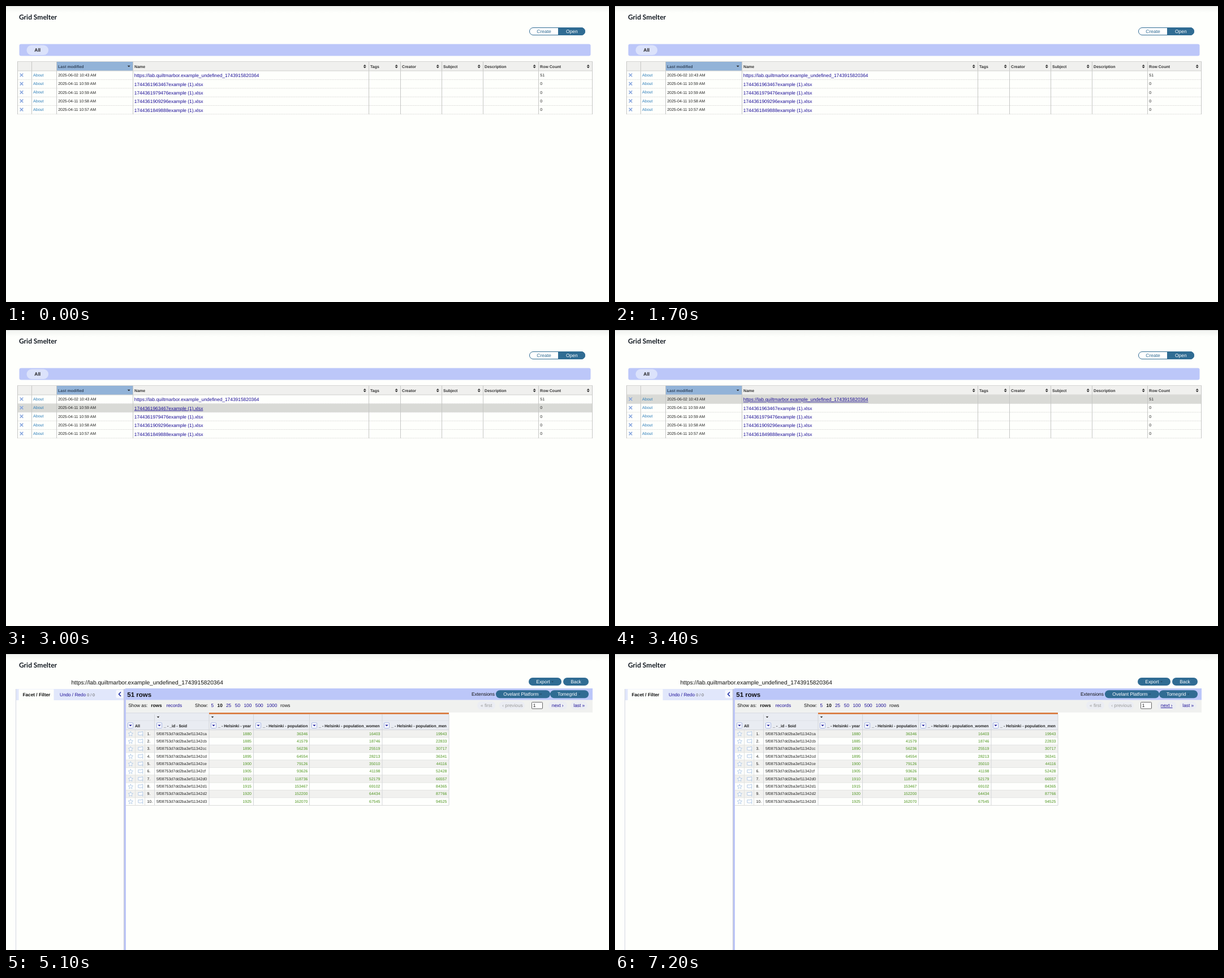
An HTML page that plays this animation: 1066x525 px, repeating every 8000 ms.

```html
<!DOCTYPE html>
<html lang="en">
<head>
<meta charset="utf-8">
<title>Table browser</title>
<style>
  html, body { margin: 0; width: 100%; height: 100%; overflow: hidden; background: #fefffc; }
  svg { display: block; width: 1066px; height: 525px; }
  text { font-family: "Liberation Sans", Arial, sans-serif; text-rendering: geometricPrecision; white-space: pre; }
  .hidden { display: none; }
</style>
</head>
<body>
<svg id="stage" viewBox="0 0 1066 525"></svg>
<script>
const LOOP = 8000;
const LINK = '#1a0d96', STEEL = '#306c93', LAVENDER = '#bcc7f9', INK = '#222';
const DATASET = 'https://lab.quiltmarbor.example_undefined_1743915820364';

const rect = (x, y, w, h, fill, extra = '') =>
  `<rect x="${x}" y="${y}" width="${w}" height="${h}" fill="${fill}" ${extra}/>`;
const text = (x, y, str, size = 7, fill = INK, extra = '') =>
  `<text x="${x}" y="${y}" font-size="${size}" fill="${fill}" ${extra}>${str}</text>`;
const bold = (x, y, str, size = 7, fill = INK) => text(x, y, str, size, fill, 'font-weight="700"');
const right = (x, y, str, fill) => text(x, y, str, 7, fill, 'text-anchor="end"');
const path = (d, stroke, width = 1, extra = 'fill="none"') =>
  `<path d="${d}" stroke="${stroke}" stroke-width="${width}" ${extra}/>`;
const vline = (x, y1, y2, color) => path(`M${x} ${y1}V${y2}`, color);
const hline = (y, x1, x2, color, extra) => path(`M${x1} ${y}H${x2}`, color, 1, extra);
const down = (x, y, r = 2.5, fill = INK) =>
  `<path d="M${x - r} ${y - r / 2}h${2 * r}l${-r} ${r}z" fill="${fill}"/>`;
const up = (x, y, r = 2.5) => `<path d="M${x - r} ${y + r / 2}h${2 * r}l${-r} ${-r}z" fill="${INK}"/>`;
const group = (id, body) => `<g id="${id}" class="hidden">${body}</g>`;
const pill = (x, y, w, label, textX, arrowX) =>
  rect(x, y, w, 14, STEEL, 'rx="7"') + text(textX, y + 10, label, 8.4, '#fff') +
  (arrowX ? down(arrowX, y + 7.2, 2, '#234c69') : '');

function backdrop() {
  return `<defs><linearGradient id="shade" x2="0" y2="1">
      <stop stop-color="#f1f3f0"/><stop offset="1" stop-color="#fefffc"/></linearGradient></defs>` +
    rect(0, 0, 1066, 525, '#fefffc') + rect(0, 0, 1066, 12, 'url(#shade)') +
    rect(0, 0, 1066, 1, '#d2d3d1') +
    `<text x="23" y="23.6" font-size="12" font-weight="700" fill="#111820"
      style="font-family:Lato,'Open Sans',sans-serif">Grid Smelter</text>`;
}

const rowTop = i => 115.4 + 15.3 * i;

function listPage() {
  const columns = [20.5, 45.5, 89.5, 224.5, 641.5, 697.5, 770.5, 843.5, 941.5, 1036.5];
  const titles = ['', '', 'Last modified', 'Name', 'Tags', 'Creator', 'Subject', 'Description', 'Row Count'];
  const projects = [
    ['2025-06-02 10:43', DATASET, 51],
    ['2025-04-11 10:59', '1744361963467example (1).xlsx', 0],
    ['2025-04-11 10:59', '1744361979476example (1).xlsx', 0],
    ['2025-04-11 10:58', '1744361909296example (1).xlsx', 0],
    ['2025-04-11 10:57', '1744361849888example (1).xlsx', 0]
  ];
  let out = rect(925.5, 38.5, 98, 13, '#fff', `rx="6.5" stroke="${STEEL}"`) +
    `<path d="M976 38h41a7 7 0 0 1 0 14h-41z" fill="${STEEL}"/>` +
    text(938.3, 48, 'Create', 8.5, STEEL) + text(990, 48, 'Open', 8.5, '#fff') +
    rect(23.5, 67.5, 1010, 21, LAVENDER, 'rx="3"') +
    rect(36.5, 69.5, 38.5, 17.5, '#dbe2fb', 'rx="8.7"') + bold(50.3, 81, 'All', 8.5) +
    rect(20.5, 98, 1016, 17, '#f0f0ee') + rect(90, 98, 134, 17, '#92b3d8') +
    rect(20.5, 0, 1016, 15.3, '#d9dad6', 'id="hover" class="hidden"');
  titles.forEach((title, i) => {
    out += bold(columns[i] + 2.6, 109.7, title, 7, i === 2 ? '#34465e' : '#333');
    const x = columns[i + 1] - 7.3;
    if (i === 2) out += down(x, 107);
    if (i > 2) out += up(x, 105.3) + down(x, 108.9);
  });
  projects.forEach(([date, name, count], i) => {
    const y = rowTop(i), mid = y + 7.1;
    out += path(`M24.7 ${mid - 2.8}l5.6 5.6m0 -5.6l-5.6 5.6`, '#86a5de', 1.5) +
      text(48, y + 9.4, 'About', 7.1, '#2b7cb8') + text(92.2, y + 9.5, date + ' AM') +
      text(226.8, y + 11, name, 8.4, LINK, 'class="name"') + text(944.3, y + 9.5, count) +
      hline(y + 15.2, 20.5, 1036.5, '#dcdcda', 'stroke-dasharray="2 1"');
  });
  columns.forEach(x => out += vline(x, 98, 192, '#c6c7c5'));
  return out + hline(98.5, 20.5, 1036.5, '#d4d4d2') + hline(115, 20.5, 1036.5, '#cfcfcd');
}

function dataFrame() {
  return text(115.4, 53.5, DATASET, 10.2, '#111') +
    pill(924, 42, 58, 'Export', 937.3, 966) + pill(985, 42, 45, 'Back', 998.2) +
    rect(17, 62, 192, 20, '#e1e7fb') + vline(17.5, 62, 525, '#d3d7e2') +
    rect(22.5, 62.5, 62, 20, '#fefffc') + bold(29.4, 75.2, 'Facet / Filter', 8.3, '#111') +
    text(95, 75.2, 'Undo / Redo', 8.2, LINK) + text(143.3, 75.2, '0 / 0', 7, '#555') +
    rect(194.5, 64, 13, 14, '#f5f7fe', 'rx="2"') + path('M203 67.5l-3.5 3.7 3.5 3.7', '#2333a8', 1.6) +
    rect(208, 62, 4, 463, '#bdc6f7') + vline(208.5, 62, 525, '#c2c5d2') +
    rect(211, 61, 826, 20.7, LAVENDER);
}

const star = (x, y) => {
  let d = '';
  for (let i = 0; i < 10; i++) {
    const a = i * Math.PI / 5, r = i % 2 ? 2 : 4.5;
    d += `${i ? 'L' : 'M'}${(x + r * Math.sin(a)).toFixed(1)} ${(y - r * Math.cos(a)).toFixed(1)}`;
  }
  return path(d + 'z', '#a9c4e4', 0.8, 'fill="#fcfdff"');
};
const flag = (x, y) => path(
  `M${x + 3.5} ${y + 4.5}v-8.5q-4 1.8 -8 1v5q4 1.2 8 -.5`, '#adc6e4', 0.9, 'fill="#fbfcff"');

function dataTable() {
  const values = [
    [36346, 16403, 19943], [41579, 18746, 22833], [56236, 25519, 30717], [64554, 28213, 36341],
    [79126, 35010, 44116], [93626, 41198, 52428], [118736, 52179, 66557], [153467, 69102, 84365],
    [152200, 64434, 87766], [162070, 67545, 94525]
  ];
  const heads = [[215, 'All'], [266, '_ - _id - $oid'], [362, '_ - Helsinki - year'],
    [441, '_ - Helsinki - population'], [540, '_ - Helsinki - population_women'],
    [668, '_ - Helsinki - population_men']];
  const edges = [262.5, 359, 437.5, 536.5, 665, 783];
  const ends = [434, 533.5, 661.5, 779.5];

  let out = bold(214.3, 76, '51 rows', 11.5, '#111') + text(823, 74.3, 'Extensions', 8.4, '#111') +
    pill(866, 64.3, 96, 'Ovelant Platform', 879.2, 945.5) + pill(962, 64.3, 68, 'Tomegrid', 975, 1013.5) +
    rect(212, 81.7, 825, 22, '#f0f1ef');

  const bar = (x, str, fill = '#111') => text(x, 94, str, 8.3, fill);
  out += bar(216.3, 'Show as:') + bold(256.3, 94, 'rows', 8.3, '#111') + bar(283.4, 'records', LINK) +
    bar(334, 'Show:') + bold(373.6, 94, '10', 8.3, '#111') + bar(485, 'rows');
  [[362.5, 5], [389, 25], [404.8, 50], [420.5, 100], [440.8, 500], [460.8, 1000]]
    .forEach(([x, n]) => out += bar(x, n, LINK));
  [[833, 32], [872, 45], [959, 33], [998, 30]]
    .forEach(([x, w]) => out += rect(x, 84, w, 14.5, '#ebedf3', 'rx="7"'));
  out += bar(839, '« first', '#999') + bar(877.3, '‹ previous', '#999') +
    text(964.8, 94, 'next ›', 8.3, LINK, 'id="next"') + bar(1003.3, 'last »', LINK) +
    rect(929.5, 85.5, 19, 11.5, '#fff', 'stroke="#666" rx="1"') + bar(931.8, '1');

  out += rect(212, 104, 571, 30.5, '#e9ecf2') + hline(104.5, 212, 359, '#d5d8df') +
    hline(118, 212, 783, '#dfe2e8') + rect(359, 104, 424, 2.7, '#d9783c') +
    down(269, 112, 2.3) + down(365, 112, 2.3);
  heads.forEach(([x, label]) => {
    out += rect(x + 0.5, 122, 9, 9.5, '#fcfdff', 'stroke="#a5b3e2" rx="1"') +
      down(x + 5, 126.8, 2.8, '#1b1b9c') + bold(x + 13, 129.5, label, 7.05);
  });

  values.forEach((row, i) => {
    const y = 134.6 + 13.36 * i, base = y + 9;
    out += rect(212, y, 571, 13.36, i % 2 ? '#fefffd' : '#f1f1ef') +
      hline(y, 212, 783, '#e4e5e3') +
      star(220.3, y + 7.2) + flag(238.3, y + 6.9) + text(249.4, base, `${i + 1}.`) +
      text(266, base, '5f08753d7dd2ba3ef11342' + (0xca + i).toString(16), 7.03);
    [1880 + 5 * i, ...row].forEach((n, c) => out += right(ends[c], base, n, '#4f9620'));
  });
  [228.5, 245.5].forEach(x => out += vline(x, 134.6, 268.5, '#e0e1e0'));
  edges.forEach(x => out += vline(x, 107, 268.5, '#d4d6da'));
  return out + hline(134.5, 212, 783, '#d4d6da') + hline(268.5, 212, 783, '#d9dad9');
}

const byId = id => document.getElementById(id);
byId('stage').innerHTML = backdrop() + group('list', listPage()) +
  group('frame', dataFrame()) + group('table', dataTable());

const names = [...document.querySelectorAll('.name')];
const show = (id, on) => byId(id).classList.toggle('hidden', !on);
const underline = (el, on) => el.setAttribute('text-decoration', on ? 'underline' : 'none');

// The pointer enters at the bottom row and climbs to the first one.
function hoveredRow(t) {
  if (t < 2400) return -1;
  if (t < 2700) return 4;
  if (t < 2800) return 3;
  if (t < 2900) return 2;
  return t < 3100 ? 1 : 0;
}

function render() {
  const t = performance.now() % LOOP;
  const row = hoveredRow(t);
  show('list', t < 4200);
  show('hover', row >= 0);
  byId('hover').setAttribute('y', rowTop(Math.max(row, 0)));
  names.forEach((el, i) => underline(el, i === row));
  show('frame', t >= 4800);
  show('table', t >= 4900);
  underline(byId('next'), t >= 7200);
  requestAnimationFrame(render);
}
render();
</script>
</body>
</html>
```
